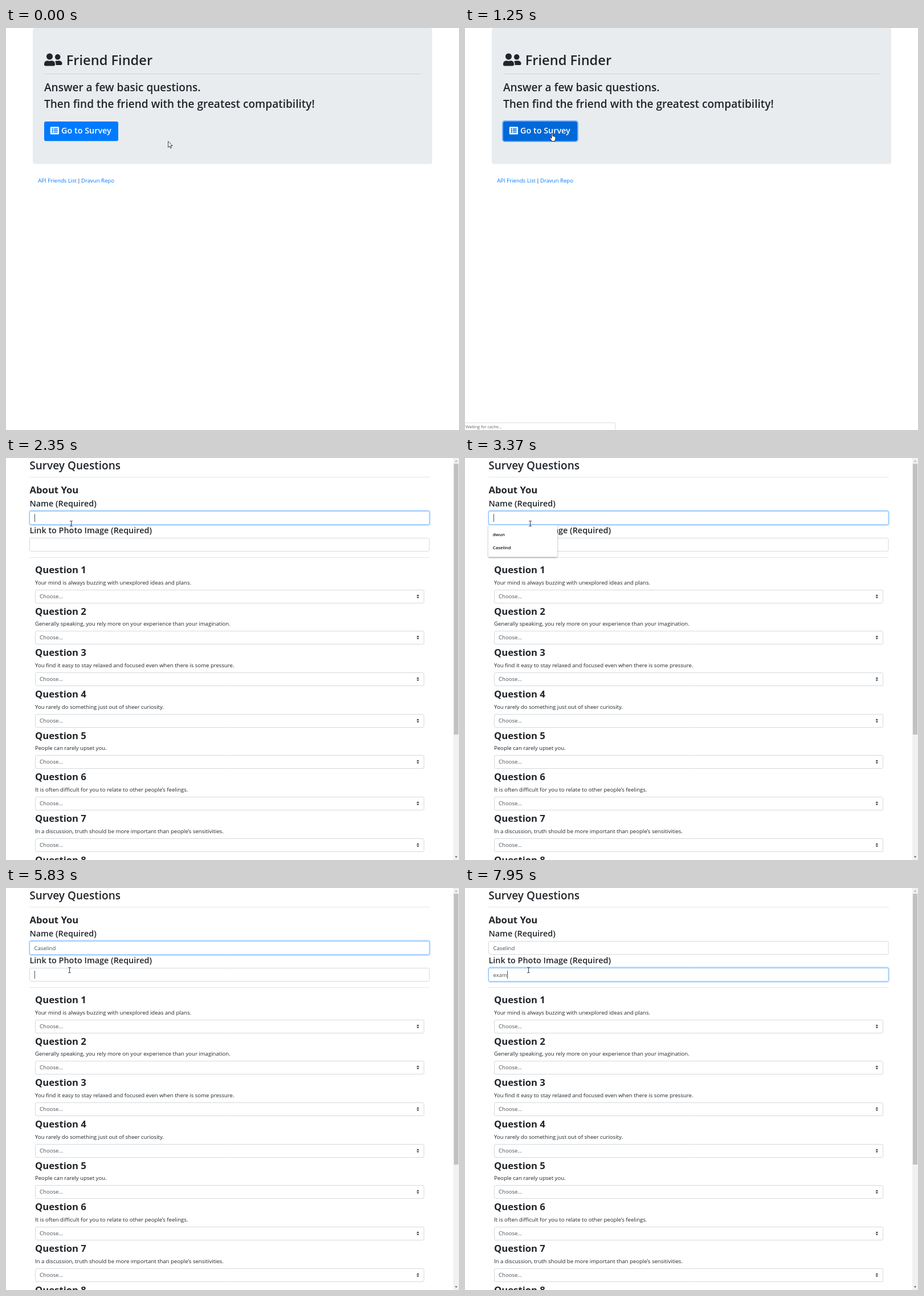
An HTML page with a canvas that plays this animation: 795 by 705 pixels, repeating every 8 s.

```html
<!DOCTYPE html>
<html lang="en">
<head>
<meta charset="utf-8">
<title>Friend Finder</title>
<style>
html, body { margin: 0; width: 100%; height: 100%; overflow: hidden; background: #fff; }
canvas { display: block; }
</style>
</head>
<body>
<canvas id="stage" width="795" height="705"></canvas>
<script>
const ctx = document.getElementById('stage').getContext('2d');
const LOOP = 8000;
const INK = '#212529', BLUE = '#007bff', GREY = '#495057', PANEL = '#e9ecef';
const BODY = '400 9.57px', H1 = '600 23.6px', H2 = '600 19.05px', H3 = '700 16.7px', H4 = '600 14.4px';

const QUESTIONS = [
  'Your mind is always buzzing with unexplored ideas and plans.',
  'Generally speaking, you rely more on your experience than your imagination.',
  'You find it easy to stay relaxed and focused even when there is some pressure.',
  'You rarely do something just out of sheer curiosity.',
  'People can rarely upset you.',
  'It is often difficult for you to relate to other people\u2019s feelings.',
  'In a discussion, truth should be more important than people\u2019s sensitivities.',
  ''
];
const NAME = 'Caselind', OTHER = 'dwun', LINK = 'exam';
const NAME_KEYS = [3480, 3680, 4150, 4350, 4440, 4520, 4600, 4690];
const LINK_KEYS = [7290, 7490, 7820, 7950];

const ramp = (t, a, b) => Math.min(1, Math.max(0, (t - a) / (b - a)));
const ease = p => p * p * (3 - 2 * p);
const mix = (a, b, p) => a + (b - a) * p;
const mixRgb = (a, b, p) => `rgb(${a.map((v, i) => Math.round(mix(v, b[i], p)))})`;
const typed = (word, keys, t) => word.slice(0, keys.filter(k => t >= k).length);

function text(str, x, y, font, color = INK) {
  ctx.font = font + ' "Open Sans", "Noto Sans", sans-serif';
  ctx.fillStyle = color;
  ctx.fillText(str, x, y);
}

function rect(x, y, w, h, color) {
  ctx.fillStyle = color;
  ctx.fillRect(x, y, w, h);
}

function box(x, y, w, h, r, fill, stroke, line = 1) {
  ctx.beginPath();
  ctx.roundRect(x, y, w, h, r);
  if (fill) { ctx.fillStyle = fill; ctx.fill(); }
  if (stroke) { ctx.strokeStyle = stroke; ctx.lineWidth = line; ctx.stroke(); }
}

function disc(x, y, r, color) {
  ctx.beginPath();
  ctx.arc(x, y, r, 0, 7);
  ctx.fillStyle = color;
  ctx.fill();
}

// Isosceles triangle with its base at y; negative h points up.
function triangle(x, y, w, h, color) {
  ctx.beginPath();
  ctx.moveTo(x - w / 2, y);
  ctx.lineTo(x + w / 2, y);
  ctx.lineTo(x, y + h);
  ctx.fillStyle = color;
  ctx.fill();
}

function at(x, y, scale, draw) {
  ctx.save();
  ctx.translate(x, y);
  ctx.scale(scale, scale);
  draw();
  ctx.restore();
}

function peopleIcon() {
  box(352, 288, 288, 160, [112, 112, 48, 48], INK);
  disc(480, 160, 136, PANEL);
  disc(480, 160, 96, INK);
  box(0, 288, 384, 192, [115, 115, 48, 48], INK, PANEL, 64);
  box(0, 288, 384, 192, [115, 115, 48, 48], INK);
  disc(192, 144, 160, PANEL);
  disc(192, 144, 112, INK);
}

function listIcon(hole) {
  box(0, 32, 512, 448, 48, '#fff');
  for (const y of [160, 256, 352]) {
    disc(128, y, 40, hole);
    box(204, y - 28, 232, 56, 12, hole);
  }
}

function homePage(t) {
  box(47, 0, 701, 238.5, 3.8, PANEL);
  at(67, 42.9, 0.0494, peopleIcon);
  text('Friend Finder', 105.8, 65, H1);
  rect(67, 80, 661, 1, '#d2d4d7');
  text('Answer a few basic questions.', 67, 111, H2);
  text('Then find the friend with the greatest compatibility!', 67, 140, H2);

  const fill = mixRgb([0, 123, 255], [0, 105, 217], ramp(t, 830, 980));
  const ring = ramp(t, 1180, 1250);
  if (ring) box(66, 163, 132, 36, 4, null, `rgba(0,123,255,${0.5 * ring})`, 2);
  box(67, 164, 130, 34.3, 3, fill);
  at(77.8, 172.3, 0.0297, () => listIcon(fill));
  text('Go to Survey', 97, 185.3, H4, '#fff');

  text('API Friends List', 56.3, 270.5, BODY, BLUE);
  text('|', 125.3, 270.5, BODY);
  text('Dravun Repo', 132, 270.5, BODY, BLUE);
}

function field(y, value, focus, caret) {
  if (focus) box(41, y - 1, 703, 26, 3.5, null, `rgba(0,123,255,${0.25 * focus})`, 2);
  box(41.5, y + 0.5, 701.5, 23, 2.5, '#fff', mixRgb([212, 217, 222], [144, 199, 255], focus));
  text(value, 49.5, y + 16, BODY, GREY);
  if (caret) rect(Math.round(49.6 + ctx.measureText(value).width), y + 5, 1, 14, GREY);
}

function question(i) {
  const y = 72.67 * i;
  text('Question ' + (i + 1), 51, 202 + y, H3);
  text(QUESTIONS[i], 51, 221.7 + y, BODY);
  const top = Math.round(230.8 + y);
  box(51.5, top + 0.5, 682, 23, 2.5, '#fff', '#d4d9de');
  text('Choose...', 59, top + 15.3, BODY, GREY);
  triangle(722.8, top + 11, 4.6, -2.8, '#343a40');
  triangle(722.8, top + 12.4, 4.6, 2.8, '#343a40');
}

function scrollbar() {
  rect(785, 0, 10, 705, '#f1f1f1');
  rect(786, 10, 8, 475, '#c1c1c1');
  triangle(790, 6.5, 4.4, -2.5, '#a3a3a3');
  triangle(790, 698.5, 4.4, 2.5, '#505050');
}

function suggestions(t) {
  if (t < 2400 || t >= 4730) return;
  const names = t < 3480 ? [OTHER, NAME] : [NAME];
  ctx.save();
  ctx.shadowColor = 'rgba(0,0,0,.4)';
  ctx.shadowBlur = 3;
  ctx.shadowOffsetY = 1;
  box(41, 118, 121, 10 + 22.8 * names.length, 1, '#fff');
  ctx.restore();
  names.forEach((n, i) => text(n, 48.7, 137 + 22.8 * i, '600 7.8px', '#111'));
}

function surveyPage(t) {
  text('Survey Questions', 41.3, 19.5, H2);
  rect(41, 33, 703, 1, '#e6e6e6');
  text('About You', 41.5, 62, H3);
  text('Name (Required)', 41.5, 85, H4);
  text('Link to Photo Image (Required)', 41.5, 132, H4);
  rect(41, 174, 703, 1, '#e6e6e6');

  const inName = t >= 2130 && t < 5830;
  const nameCaret = inName && !(t >= 2840 && t < 3370) && !(t >= 5220 && t < 5750);
  const linkCaret = t >= 5830 && !(t >= 6360 && t < 6900);
  const swap = ramp(t, 5830, 5960);
  field(93, typed(NAME, NAME_KEYS, t), ramp(t, 2130, 2280) * (1 - swap), nameCaret);
  field(140, typed(LINK, LINK_KEYS, t), swap, linkCaret);
  QUESTIONS.forEach((q, i) => question(i));
  scrollbar();
  suggestions(t);
}

function statusBar(t) {
  const alpha = ramp(t, 960, 1080) * (1 - ramp(t, 1610, 1700));
  if (!alpha) return;
  ctx.globalAlpha = alpha;
  box(-2, 692.3, 265.8, 16, 2, '#fff', '#dcdcdc');
  if (t >= 1180) text('Waiting for cache...', 1, 702, '400 7.2px', '#666');
  ctx.globalAlpha = 1;
}

const ARROW = new Path2D('M0 0V10.6L2.5 8.3 4.2 12.1 5.9 11.3 4.2 7.7H7.6Z');
const HAND = new Path2D('M-1 .8Q0-.6 1 .8V5Q2 4.3 2.7 5.3 3.7 4.8 4.3 5.8 5.9 5.3 5.9 7V9.8' +
  'Q5.9 11.3 4.8 12.2V13.9H-1.2V12.4L-4 8.6Q-4.5 7 -3 7L-1 8.7Z');

function pointer(shape, x, y) {
  at(x, y, 1, () => {
    ctx.fillStyle = '#fff';
    ctx.fill(shape);
    ctx.strokeStyle = '#111';
    ctx.lineWidth = 0.8;
    ctx.lineJoin = 'round';
    ctx.stroke(shape);
  });
}

function beam(x, y) {
  rect(x - 0.5, y - 5, 1, 10, '#333');
  for (const end of [-5, 4]) rect(x - 2.5, y + end, 5, 1, '#555');
}

function cursor(t) {
  const a = ease(ramp(t, 370, 1120)), b = ease(ramp(t, 1610, 1870)), c = ease(ramp(t, 5490, 5750));
  const x = mix(mix(mix(284.6, 153, a), 114, b), 111.5, c);
  const y = mix(mix(mix(198.8, 184.8, a), 115, b), 144, c);
  if (t < 1610) pointer(x < 197 ? HAND : ARROW, x, y);
  else if (y > 164) pointer(ARROW, x, y);
  else beam(Math.floor(x) + 0.5, Math.round(y));
}

function draw(t) {
  rect(0, 0, 795, 705, '#fff');
  (t < 1380 ? homePage : surveyPage)(t);
  statusBar(t);
  cursor(t);
}

const start = performance.now();
function tick() {
  draw((performance.now() - start) % LOOP);
  requestAnimationFrame(tick);
}
tick();
</script>
</body>
</html>
```
